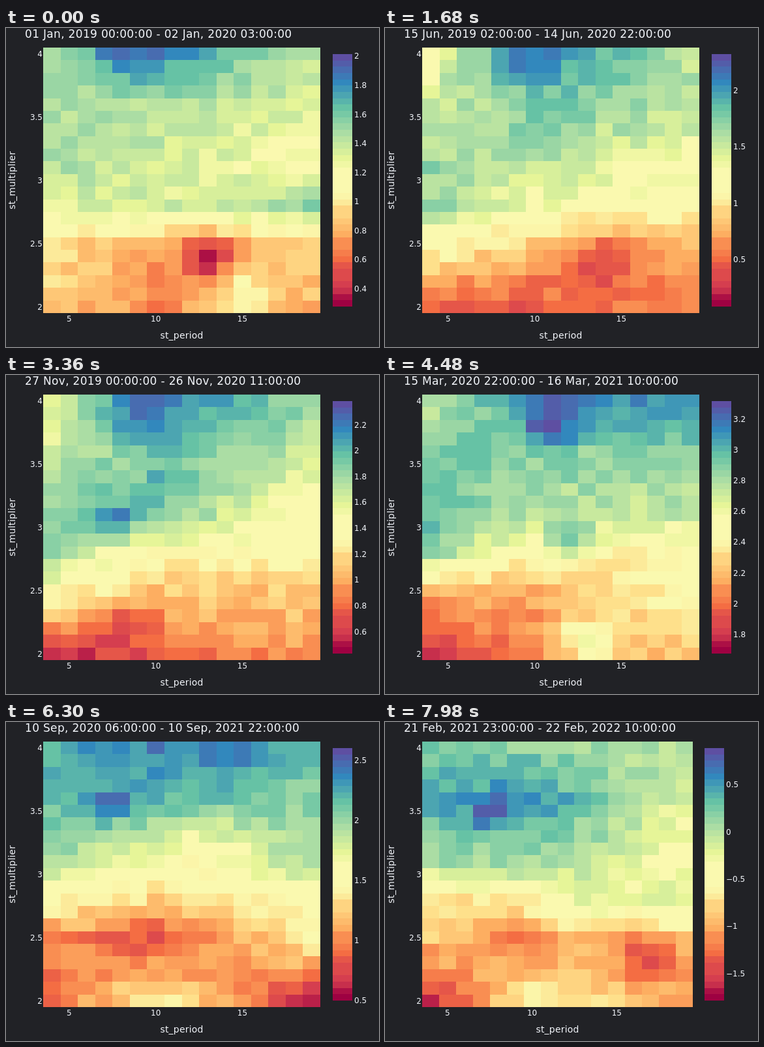
These frames come from a looping animation (572x489 px, 8000 ms). An HTML page:

```html
<!DOCTYPE html>
<html lang="en">
<head>
<meta charset="utf-8">
<title>Parameter heatmap</title>
<style>
html, body { margin: 0; width: 100%; height: 100%; overflow: hidden; background: #212226; }
svg { display: block; width: 572px; height: 489px; }
text { font: 12px Verdana, 'DejaVu Sans', sans-serif; fill: #f2f5fa; }
.title { font-size: 17px; letter-spacing: .32px; white-space: pre; }
.axis { font-size: 14px; letter-spacing: .2px; }
.mid { text-anchor: middle; }
.end { text-anchor: end; }
rect { shape-rendering: crispEdges; }
</style>
</head>
<body>
<svg id="stage" viewBox="0 0 572 489"></svg>
<script>
const LOOP = 8000, STEP = 140, COLS = 16, ROWS = 21, MID = 6;
const LEFT = 57, TOP = 30, HEIGHT = 407, BAR_TOP = 40, BAR_H = 387, BANDS = 40;
const MONTHS = 'Jan Feb Mar Apr May Jun Jul Aug Sep Oct Nov Dec'.split(' ');

// Levels are given down three columns at these rows; peaks are [col, row, radius, height].
const KNOTS = [0, 4, 9, 12, 15, 20];
const scenes = [
  { at: 0, from: '2019-01-01T00', to: '2020-01-02T03', z: [.274, 2.013],
    left: [.7, .7, .69, .62, .4, .36], mid: [.92, .68, .64, .62, .3, .25], right: [.68, .62, .52, .74, .36, .32],
    peaks: [[4, .5, 2, .1], [9, 16, 1.6, -.3], [11, 19, 2, .17]] },
  { at: 12, from: '2019-06-15T02', to: '2020-06-14T22', z: [.081, 2.318],
    left: [.6, .64, .72, .72, .52, .16], mid: [.92, .78, .66, .56, .36, .15], right: [.68, .68, .52, .5, .33, .25],
    peaks: [[4.5, .5, 1.2, .08], [0, .5, 1, -.1], [10, 16, 2.5, -.15]] },
  { at: 24, from: '2019-11-27T00', to: '2020-11-26T11', z: [.428, 2.382],
    left: [.65, .62, .78, .72, .5, .06], mid: [.92, .8, .78, .48, .37, .18], right: [.73, .65, .5, .5, .35, .28],
    peaks: [[4.5, 1, 1.5, .08], [4, 9.5, 1.2, .12], [4, 17.5, 2, -.12]] },
  { at: 32, from: '2020-03-15T22', to: '2021-03-16T10', z: [1.673, 3.317],
    left: [.66, .76, .8, .76, .32, .08], mid: [.9, .76, .68, .45, .3, .24], right: [.87, .74, .66, .46, .5, .36],
    peaks: [[7, 2, 1.5, .15], [8, 11, 1.4, .28], [9, 19, 1.6, .28]] },
  { at: 37, from: '2020-05-23T12', to: '2021-05-24T03', z: [.159, 2.601],
    left: [.92, .92, .88, .66, .3, .14], mid: [.93, .87, .68, .44, .2, .3], right: [.84, .72, .66, .44, .42, .08],
    peaks: [[10, 1.5, 2.5, .05], [5, 15, 1.2, -.08], [9, 9.5, 2.2, -.13]] },
  { at: 45, from: '2020-09-10T06', to: '2021-09-10T22', z: [.495, 2.598],
    left: [.85, .82, .72, .5, .24, .2], mid: [.9, .82, .56, .38, .14, .44], right: [.8, .74, .7, .5, .46, .06],
    peaks: [[10, 1, 2.5, .07], [3.5, 4.5, 1.2, .14], [9, 8, 2.5, -.12]] },
  { at: 57, from: '2021-02-21T23', to: '2022-02-22T10', z: [-1.79, .884],
    left: [.76, .84, .7, .42, .36, .1], mid: [.74, .89, .72, .47, .22, .47], right: [.68, .6, .55, .62, .4, .3],
    peaks: [[3.5, 5.3, 1.2, .14], [13, 16.7, 2, -.22], [9, 13, 2, .12]] }
];

const STOPS = [0, .1, .2, .3, .4, .46, .55, .6, .7, .8, .9, 1];
const INKS = ['9e0142', 'd53e4f', 'f46d43', 'fdae61', 'fee08b', 'faf9af', 'faf9af',
  'e6f598', 'abdda4', '66c2a5', '3288bd', '5e4fa2'].map(h => parseInt(h, 16));

const mix = (a, b, k) => a + (b - a) * k;

// Index of the segment holding x and the fraction within it.
function locate(knots, x) {
  let i = 0;
  while (i < knots.length - 2 && knots[i + 1] < x) i++;
  return [i, (x - knots[i]) / (knots[i + 1] - knots[i])];
}

function color(level) {
  const v = Math.round(Math.min(1, Math.max(0, level)) * BANDS) / BANDS;
  const [i, k] = locate(STOPS, v);
  const rgb = [16, 8, 0].map(s => Math.round(mix(INKS[i] >> s & 255, INKS[i + 1] >> s & 255, k)));
  return `rgb(${rgb})`;
}

function noise(c, r, seed) {
  const s = Math.sin(c * 127.1 + r * 311.7 + seed * 74.7) * 43758.5453;
  return (s - Math.floor(s) - .5) * .1;
}

function level(scene, seed, c, r) {
  const [i, k] = locate(KNOTS, r);
  const [l, m, e] = [scene.left, scene.mid, scene.right].map(p => mix(p[i], p[i + 1], k));
  const base = c < MID ? mix(l, m, c / MID) : mix(m, e, (c - MID) / (COLS - 1 - MID));
  return scene.peaks.reduce((sum, [x, y, radius, h]) =>
    sum + h * Math.exp(-((c - x) ** 2 + (r - y) ** 2) / radius ** 2), base + noise(c, r, seed));
}

for (const [i, s] of scenes.entries()) {
  s.cells = Array.from({ length: COLS * ROWS }, (_, j) => level(s, i + 1, j % COLS, Math.floor(j / COLS)));
  s.dates = [s.from, s.to].map(d => Date.parse(d + ':00:00Z'));
}

const stage = document.getElementById('stage');
function set(el, attrs) {
  for (const k in attrs) el.setAttribute(k, attrs[k]);
  return el;
}
function add(tag, attrs, content = '') {
  const el = set(document.createElementNS('http://www.w3.org/2000/svg', tag), attrs);
  el.textContent = content;
  return stage.appendChild(el);
}

const cells = Array.from({ length: COLS * ROWS }, () => add('rect', {}));
const bar = Array.from({ length: BANDS }, (_, i) => {
  const y = Math.round(BAR_TOP + BAR_H * i / BANDS);
  const next = Math.round(BAR_TOP + BAR_H * (i + 1) / BANDS);
  return add('rect', { y, width: 30, height: next - y, fill: color(1 - (i + .5) / BANDS) });
});
const title = add('text', { class: 'title', x: 29, y: 15 });
const xTitle = add('text', { class: 'axis mid', y: 476 }, 'st_period');
add('text', { class: 'axis mid', transform: 'translate(14 233.5) rotate(-90)' }, 'st_multiplier');
const xTicks = [5, 10, 15].map(v => add('text', { class: 'mid', y: 450 }, v));
for (const v of [2, 2.5, 3, 3.5, 4])
  add('text', { class: 'end', x: 56, y: TOP + HEIGHT * ((4 - v) * 10 + .5) / ROWS + 4.4 }, v);
const barTicks = Array.from({ length: 12 }, () => add('text', {}));

let width = 0;
function layout(w) {
  if (w === width) return;
  width = w;
  const px = c => LEFT + Math.round(w * c / COLS);
  const py = r => TOP + Math.round(HEIGHT * r / ROWS);
  cells.forEach((el, i) => {
    const c = i % COLS, r = Math.floor(i / COLS);
    set(el, { x: px(c), y: py(r), width: px(c + 1) - px(c), height: py(r + 1) - py(r) });
  });
  bar.forEach(el => set(el, { x: LEFT + w + (w < 425 ? 18 : 19) }));
  xTicks.forEach((el, i) => set(el, { x: LEFT + w * (i * 5 + 1.5) / COLS }));
  set(xTitle, { x: LEFT + w / 2 });
}

function stamp(ms) {
  const d = new Date(Math.round(ms / 36e5) * 36e5);
  const two = n => String(n).padStart(2, '0');
  return `${two(d.getUTCDate())} ${MONTHS[d.getUTCMonth()]}, ${d.getUTCFullYear()} ${two(d.getUTCHours())}:00:00`;
}

function draw(step) {
  const i = Math.max(1, scenes.findIndex(s => s.at >= step));
  const a = scenes[i - 1], b = scenes[i], k = (step - a.at) / (b.at - a.at);
  const [lo, hi] = a.z.map((v, j) => mix(v, b.z[j], k));
  const gap = hi - lo > 2 ? .5 : .2;
  const first = Math.ceil(lo / gap), last = Math.floor(hi / gap);

  layout(first < 0 ? 415 : 425);
  title.textContent = a.dates.map((d, j) => stamp(mix(d, b.dates[j], k))).join(' - ');
  cells.forEach((el, j) => set(el, { fill: color(mix(a.cells[j], b.cells[j], k)) }));
  barTicks.forEach((el, j) => {
    const n = first + j, v = n * gap;
    el.textContent = n > last ? '' : String(+v.toFixed(1)).replace('-', '\u2212');
    set(el, { x: LEFT + width + (width < 425 ? 51 : 52), y: BAR_TOP + BAR_H * (hi - v) / (hi - lo) + 4.6 });
  });
}

const start = performance.now();
let shown = -1;
function tick() {
  const step = Math.floor((performance.now() - start) % LOOP / STEP);
  if (step !== shown) draw(shown = step);
  requestAnimationFrame(tick);
}
tick();
</script>
</body>
</html>
```
